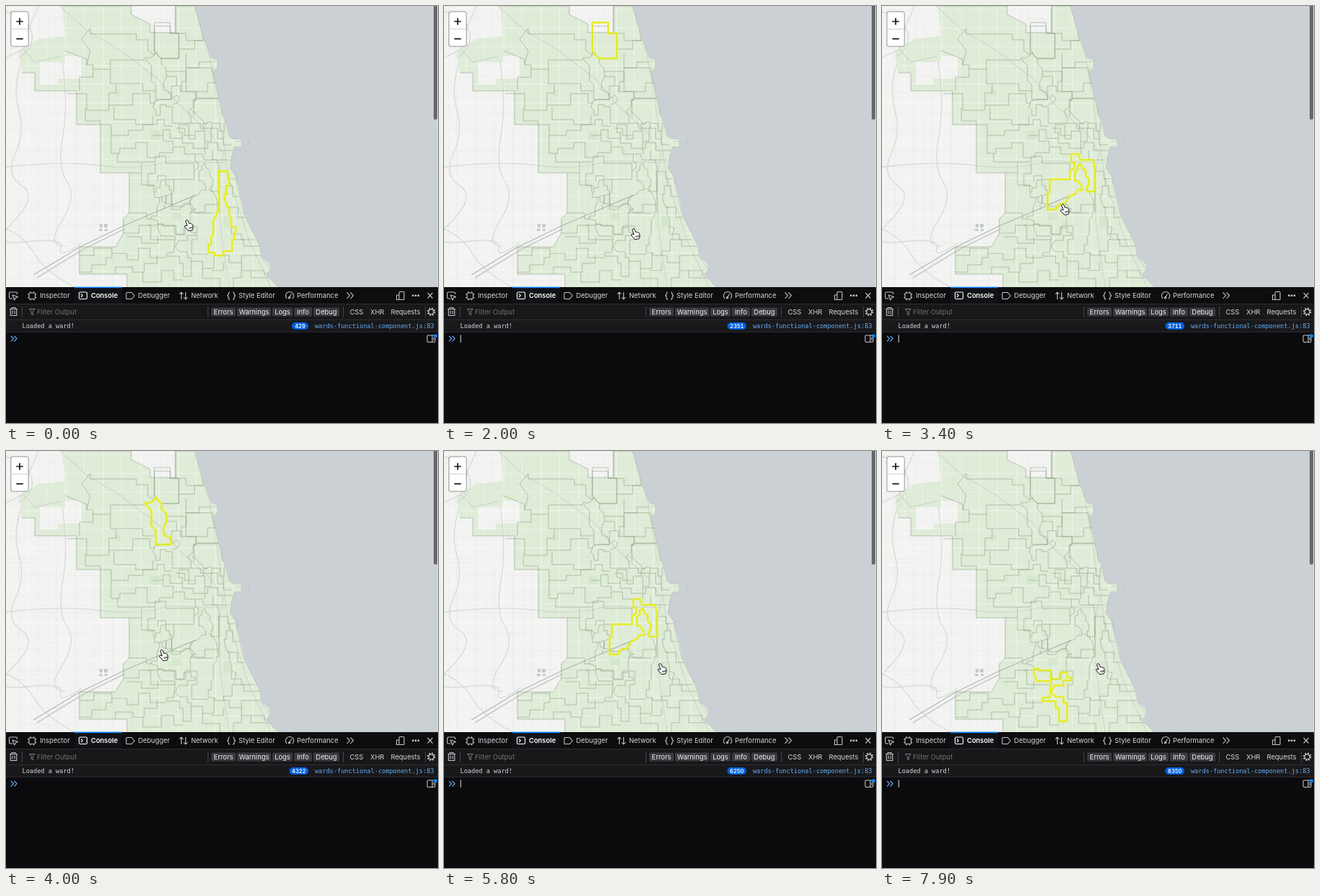
Animation, 600 px wide and 580 px high, one loop 8 s. Source, as an HTML page:

```html
<!DOCTYPE html>
<html lang="en">
<head>
<meta charset="utf-8">
<title>Ward map</title>
<style>
html, body { margin: 0; width: 100%; height: 100%; overflow: hidden; background: #0b0b0d; }
svg { display: block; width: 600px; height: 580px; }
path { fill: none; stroke-linejoin: round; }
text { font: 9.4px Inter, sans-serif; fill: #d7d7db; }
.mono { font: 8.6px "DejaVu Sans Mono", monospace; }
.mid { text-anchor: middle; }
#tint { fill: #dfecd7; }
#parks path { fill: #cfe4c8; }
#lines path, #wards path { stroke: #788a72; stroke-width: .75; stroke-opacity: .62; }
#icons path, #icons circle, #icons rect { fill: none; stroke: #c4c4c8; stroke-width: 1.1; }
#count { font-size: 7.5px; font-weight: 600; fill: #fff; font-variant-numeric: tabular-nums; }
#hand { fill: #fff; stroke: #111; }
</style>
</head>
<body>
<svg viewBox="0 0 600 580">
  <defs>
    <clipPath id="map"><rect width="600" height="391"/></clipPath>
    <clipPath id="land"><path d="M0 0H262L265 12 272 36 280 60 285 72 294 75 293 87 288 91 291 107 296 130 302 152 306 165 310 181 316 185H327V196H317L312 211 311 226 318 235 322 252 328 275 330 288 340 310 352 333 355 350 365 358 367 366 361 374 378 391H0Z"/></clipPath>
  </defs>
  <g clip-path="url(#map)">
    <rect width="600" height="391" fill="#cad0d3"/>
    <g clip-path="url(#land)">
      <rect width="400" height="391" fill="#f3f3f2"/>
      <path id="tint" fill-rule="evenodd" d="M78 0H174V12L200 25V37H235V0H400V391H168V373H102V335H152L163 316V296L171 288V232H131V165H98V118H40V93H22L18 62 45 46 82 42ZM47 78H82V69H105V101H72V109H47Z"/>
      <g id="streets"></g>
      <g stroke="#c9d2cb" stroke-opacity=".7" stroke-width="1.3">
        <path d="M0 72L24 60 32 30 45 0M24 60L40 78 76 70M75 0L112 34 158 61 210 101 240 137 284 177 302 205 296 235 297 300 302 340 310 391M262 0L283 72 300 178 310 240 338 327 368 391"/>
        <path d="M0 224Q80 215 131 222T226 216L304 218M21 80Q9 115 18 145T13 205 22 250 10 300 28 328 76 337 105 330M78 78Q87 135 79 180T85 245 77 300 83 334"/>
        <path d="M0 310Q25 320 40 345T95 391M0 8Q28 14 35 35T18 72"/>
      </g>
      <path d="M38 374L75 352 101 336 165 305 214 284 263 263" stroke="#adb8af" stroke-width="1.2"/>
      <path d="M43 378L85 352 112 336 165 310" stroke="#c6cdc8" stroke-width="1.6"/>
      <g fill="#c5cccb"><rect x="130" y="303" width="4" height="5"/><rect x="136" y="303" width="5" height="5"/><rect x="129" y="310" width="5" height="3"/><rect x="137" y="310" width="4" height="3"/></g>
      <g id="parks" opacity=".6"><path d="M201 174H214V186H201ZM151 116H159V125H151ZM230 288H244V298H230ZM286 80L292 88 302 150 296 142ZM302 292H311V308H302Z"/></g>
      <g id="lines">
        <path d="M78 0H174V12L200 25V37H235V0M168 391V373H102V335H152L163 316V296L171 288V232H131V165H98V118H40V93H22"/>
        <path d="M105 46L117 31V39H181V47H197V62L206 68M82 62L112 74V82H121V99H102V118M121 88H145V108H190V118H208M85 122H112V145H143V121H153V109M110 142V160H131V165M143 138H176V122H200V135H207M150 140V158H180V165H204V152M112 82L117 62 105 46M145 88V75H193"/>
        <path d="M206 28V68M206 28H228V38H240V60H262V48H275M216 73H240V60M250 66V86H268V78H285M223 91H250V105H244V119M223 98H237V111M264 119H280V107H291M264 131H261M258 147H261V154M257 163H270V170H286V163"/>
        <path d="M146 180V205H158V198H180V190H196V211H213V204H232V196H248V206H263M131 165H146V180H170V173H190V165H210V158H220V167H231M155 205V217H188V232H171M188 217H207V209H222V219H261V230"/>
        <path d="M204 180H218V172H228V184H245V176H240V165H254V185H263V174H276V188H285V170H294V185H302V174M218 180V188H232V194M245 184V191H260V198H280V190H294V201H316M276 188V206M287 201V214H310M302 185V193H313M274 174V163H281M236 170H248V180H262"/>
        <path d="M171 288H195V296H202M188 232V249H205V259M207 219V233H197V250H208M233 241H222V236H211V244M216 266L222 263V275H230M163 316H185V305H201V325H235M197 305H211M220 277V283M256 287H276V276H295M256 306H265V325H258V345H281M258 265Q250 279 264 288H288M281 254Q295 260 294 284"/>
        <path d="M308 240H318M310 250H315V265H324M308 280H322V294H332M313 306V317H327V325H345M317 325H330V334H352M302 347H310V357H327V347H354M327 357V368H340V378H371M340 368H359V375"/>
        <path d="M102 347H122V337H147V350H139V360H119V370H102M147 344H168V353H184V337H200V350H223M152 373V363H176V370H192V358H210V346M190 370V384H216V368H233V381H246M257 355H273V365H289V343M273 365V379H297V391M302 357V368H285M316 391V378H327V368M168 321H188V330H211V320"/>
      </g>
      <g id="wards">
        <path id="southLakeside" d="M295 230H308V240H310V250H306V262H303L304 270 308 280H310V290L313 296V306L320 309 317 318V325H314V341H302V347H290V343H281V332H285V320L288 318V298L292 292V286H296Z"/>
        <path id="southwest" d="M214 247L216 242H222V250H227V256H230V271L232 279H245L252 275H257L260 281 264 283H258V287H256V306H249V318H236V306H218V304H211V299L202 296V292H210V280L213 273V266H206V259H208V253H214ZM213 266L216 265 217 272 222 275 223 264 230 261"/>
        <path id="riverBend" d="M230 111H242V119H264V131H260V141L253 146 257 155V163H231V140H222V137H214V152H208V145L204 141 207 132 216 130H230ZM231 137L239 134 241 128 237 124 232 128"/>
        <path id="northwest" d="M193 72H201L206 68 209 64 212 70 216 73V81L222 86 223 98 219 106V117L228 120 230 130H208V110L202 104V83L196 77Z"/>
        <path id="nearSouth" d="M263 206H273L275 214H293L296 225V258H285V250H287V240L283 237V229L278 225 276 219 272 222V228L268 230V243H272L277 250 278 256H272L267 262 260 265 254 275H248L242 280V283H230V262L233 258V241H261V230L267 225V218H263Z"/>
        <path id="nearNorth" d="M261 129H296L299 140 300 152 307 157 303 163V174H297V163H288L284 161H281L277 165 272 158 266 153 261 146Z"/>
        <path id="farSouth" d="M211 303H218V305H234V317H247V308H257V315H263V319H252V326H240L235 335 241 342H252V350H257V376H246V358H241V348H223V343H233L235 320H215L211 310Z"/>
        <path id="lakefront" d="M250 86H286L290 105 296 128H264V119H250Z"/>
        <path id="northSide" d="M206 28V23H228V38H240V73H216L212 70 206 62Z"/>
        <path id="farNorth" d="M236 0H262L272 36 274 48H250V38H236Z"/>
      </g>
    </g>
    <path d="M262 0L272 36 285 72 294 75 293 87 288 91 296 130 310 181 316 185H327V196H317L311 226 318 235 330 288 352 333 355 350 367 366 361 374 378 391" stroke="#b9c4bc" stroke-width=".7"/>
    <path d="M316 232Q323 235 321 248M319 188H327M286 77H295M337 186V192" stroke="#b3beb9" stroke-width=".7"/>
    <path class="hot" stroke="#eff42a" stroke-width="4" stroke-opacity=".38"/>
    <path class="hot" stroke="#e8ee12" stroke-width="1.7"/>
    <rect x="6" y="7" width="26" height="50" rx="4" fill="#000" fill-opacity=".25"/>
    <rect x="7.5" y="8.5" width="23" height="47" rx="2.5" fill="#fff"/>
    <path d="M7.5 32H30.5" stroke="#ccc"/>
    <path d="M14.3 21.5H23.7M19 16.8V26.2M14.3 45.7H23.7" stroke="#111" stroke-width="1.7"/>
    <path d="M599.5 0V391" stroke="#e0e2e3"/>
    <rect x="594" y="-5" width="5" height="163" rx="2.5" fill="#66696b"/>
  </g>

  <rect y="391" width="600" height="189" fill="#0b0a0d"/>
  <rect y="391" width="600" height="23" fill="#0d0d0f"/>
  <rect y="414" width="600" height="22" fill="#18181a"/>
  <rect y="436" width="600" height="17" fill="#19191c"/>
  <path d="M0 414.5H600M0 436.5H600M0 453.5H600" stroke="#343438" stroke-width=".8"/>
  <rect x="95" y="391" width="66" height="23" fill="#111216"/>
  <rect x="95" y="390.6" width="66" height="1.6" fill="#0a84ff"/>
  <path d="M280.5 418V433M468.5 418V433M582.5 418V433M22.5 418V433" stroke="#45454a"/>
  <g id="labels"></g>
  <g id="icons">
    <path d="M9 407H6Q4.5 407 4.5 405V399.5Q4.5 398 6 398H14Q15.5 398 15.5 399.5V401M9 402L16.5 404.5 13.2 406 11.7 409Z"/>
    <rect x="32" y="399" width="8.5" height="8.5" rx="1.5"/><path d="M34 397V399M38.5 397V399M34 407.5V409.5M38.5 407.5V409.5M30 401H32M30 405.5H32M40.5 401H42.5M40.5 405.5H42.5"/>
    <rect x="101.5" y="398" width="11" height="9.5" rx="1.5" style="stroke:#fff"/><path d="M104 400.5L106.5 402.7 104 405" style="stroke:#fff"/>
    <path d="M168 398.5H174.5L178.5 403 174.5 407.5H168Q167 407.5 167 406.5V399.5Q167 398.5 168 398.5Z"/>
    <path d="M243.5 408V398M240.8 401L243.5 398 246.2 401M249.5 398V408M246.8 405L249.5 408 252.2 405"/>
    <path d="M311 398Q309 398 309 400V401.5L307.5 403 309 404.5V406Q309 408 311 408M315 398Q317 398 317 400V401.5L318.5 403 317 404.5V406Q317 408 315 408"/>
    <path d="M390 407A5.6 5.6 0 1 1 398 407M393.5 405.5L396.5 400.5"/><circle cx="393.5" cy="405.8" r="1.2"/>
    <path d="M473.5 398.5L477.5 402.7 473.5 407M478.5 398.5L482.5 402.7 478.5 407"/>
    <rect x="546" y="397.5" width="7" height="11" rx="1.3"/><path d="M546 402H542.5V408.5H546"/>
    <path d="M564 402.7H566.4M567.8 402.7H570.2M571.6 402.7H574" style="stroke-width:2.4"/>
    <path d="M585.5 399L592.5 406.5M592.5 399L585.5 406.5"/>
    <path d="M5 421.5H16M8 421V419.5H13V421M6.3 422V430.5H14.7V422M9 423.5V428.5M12 423.5V428.5"/>
    <path d="M32.5 421.5H40L37.2 425V430L35.2 428.5V425Z" style="stroke:#8b8b90;stroke-width:.9"/>
    <circle cx="590.5" cy="425.3" r="4.8" style="stroke-width:2;stroke-dasharray:1.9 1.87"/><circle cx="590.5" cy="425.3" r="3.4"/>
    <rect x="585" y="458" width="11" height="9.5" rx="1.4"/><path d="M592 458V467.5M593 462H595M593 464H595"/>
  </g>
  <circle cx="596.5" cy="458.8" r="2.5" fill="#0a84ff"/>
  <text class="mono" x="22.5" y="447.5">Loaded a ward!</text>
  <text class="mono" x="594.5" y="447.5" text-anchor="end" style="fill:#63aef5">wards-functional-component.js:83</text>
  <rect id="badge" y="440" height="10" rx="5" fill="#0060df"/>
  <text id="count" class="mid" y="447.7"></text>
  <path d="M7 459L10.5 462.7 7 466.5M11.5 459L15 462.7 11.5 466.5" stroke="#62aaf0" stroke-width="1.2"/>
  <path id="caret" d="M23.2 457.5V468" stroke="#e4e4e8"/>
  <path id="hand" d="M-2 2L-4.4-4Q-4.7-6-3.2-6.3Q-1.8-6.4-1.2-5L.3-1.4Q1-2.2 1.9-1.2Q2.8-2 3.7-.7Q4.9-1.1 5.3.2L6 3.2Q6.2 5 5 7.8L-.8 8.7Q-1.4 7-4.3 4.8L-5.8 3Q-6 1.2-4.2 1.2ZM.6 3.7L1.1 6M2.5 3.3L2.9 5.5M4.2 3L4.5 5"/>
</svg>
<script>
const $ = id => document.getElementById(id);
const lerp = (a, b, p) => a + (b - a) * p;

// Street grid: pale main roads with finer side streets.
let streets = '';
const road = (d, color, width) =>
  streets += `<path d="${d}" stroke="${color}" stroke-width="${width}" stroke-opacity=".5"/>`;
for (let i = 0; i < 32; i++) {
  const p = i * 13 + 5, bend = Math.sin(i * 4.7) * 3;
  const style = i % 2 ? ['#d9e2d6', .6] : ['#fff', 1];
  road(`M0 ${p + bend}L130 ${p}H400`, ...style);
  road(`M${p + bend} 0L${p} 160V391`, ...style);
  if (i % 4 === 0) {
    road(`M0 ${p + bend + 1}L130 ${p + 1}H400`, '#d0d8cf', .5);
    road(`M${p + bend + 1} 0L${p + 1} 160V391`, '#d0d8cf', .5);
  }
}
$('streets').innerHTML = streets;

const label = (text, x, y, color = '#d7d7db', weight = 400) =>
  `<text x="${x}" y="${y}" style="fill:${color};font-weight:${weight}">${text}</text>`;
const chip = (text, x, w) =>
  `<rect x="${x}" y="419.5" width="${w}" height="12" rx="1.5" fill="#3a3a3f"/>
   <text class="mid" x="${x + w / 2}" y="428.8" style="fill:#f0f0f4">${text}</text>`;
$('labels').innerHTML =
  label('Inspector', 47, 406.2) + label('Console', 118, 406.2, '#fff', 600) +
  label('Debugger', 183.5, 406.2) + label('Network', 257, 406.2) +
  label('Style Editor', 323, 406.2) + label('Performance', 404, 406.2) +
  label('Filter Output', 43, 428.8, '#737378') +
  chip('Errors', 285, 34) + chip('Warnings', 321, 47) + chip('Logs', 370, 28) +
  chip('Info', 400, 25) + chip('Debug', 427, 36) +
  label('CSS', 477.5, 428.8) + label('XHR', 506, 428.8) + label('Requests', 534.5, 428.8);

// Time, log count and pointer position.
const keys = [
  [0, 429, 254, 304], [1100, 1500, 249, 351], [2900, 3201, 283, 281],
  [4000, 4322, 219, 283], [5800, 6250, 303, 302],
  [7000, 7450, 303, 302], [7900, 8350, 303, 302]
];
const cycle = ['northwest', 'southLakeside', 'nearSouth', 'southwest',
  'lakefront', 'riverBend', 'nearNorth', 'farSouth'];

// The northern wards drop out of the cycle as the pointer moves south.
function wardAt(t) {
  const name = cycle[t / 100 % cycle.length];
  if (name === 'northwest' && t < 3700) return 'southLakeside';
  if (name === 'lakefront' && t < 2800) return t < 1000 ? 'farNorth' : 'northSide';
  return name;
}

function draw() {
  const t = Math.floor(performance.now() % 8000 / 100) * 100;
  const i = Math.max(1, keys.findIndex(k => k[0] >= t));
  const a = keys[i - 1], b = keys[i];
  const p = (t - a[0]) / (b[0] - a[0]);
  const [, count, x, y] = a.map((v, k) => lerp(v, b[k], p));
  const total = Math.round(count);
  const left = total < 1000 ? 397 : 393.5;

  const outline = $(wardAt(t)).getAttribute('d');
  document.querySelectorAll('.hot').forEach(el => el.setAttribute('d', outline));
  $('count').textContent = total;
  $('count').setAttribute('x', (left + 420) / 2);
  $('badge').setAttribute('x', left);
  $('badge').setAttribute('width', 420 - left);
  $('hand').setAttribute('transform', `translate(${x} ${y})`);
  const blink = t % 1360;
  $('caret').style.opacity = blink > 340 && blink < 1120 ? 1 : 0;
  requestAnimationFrame(draw);
}
draw();
</script>
</body>
</html>
```
